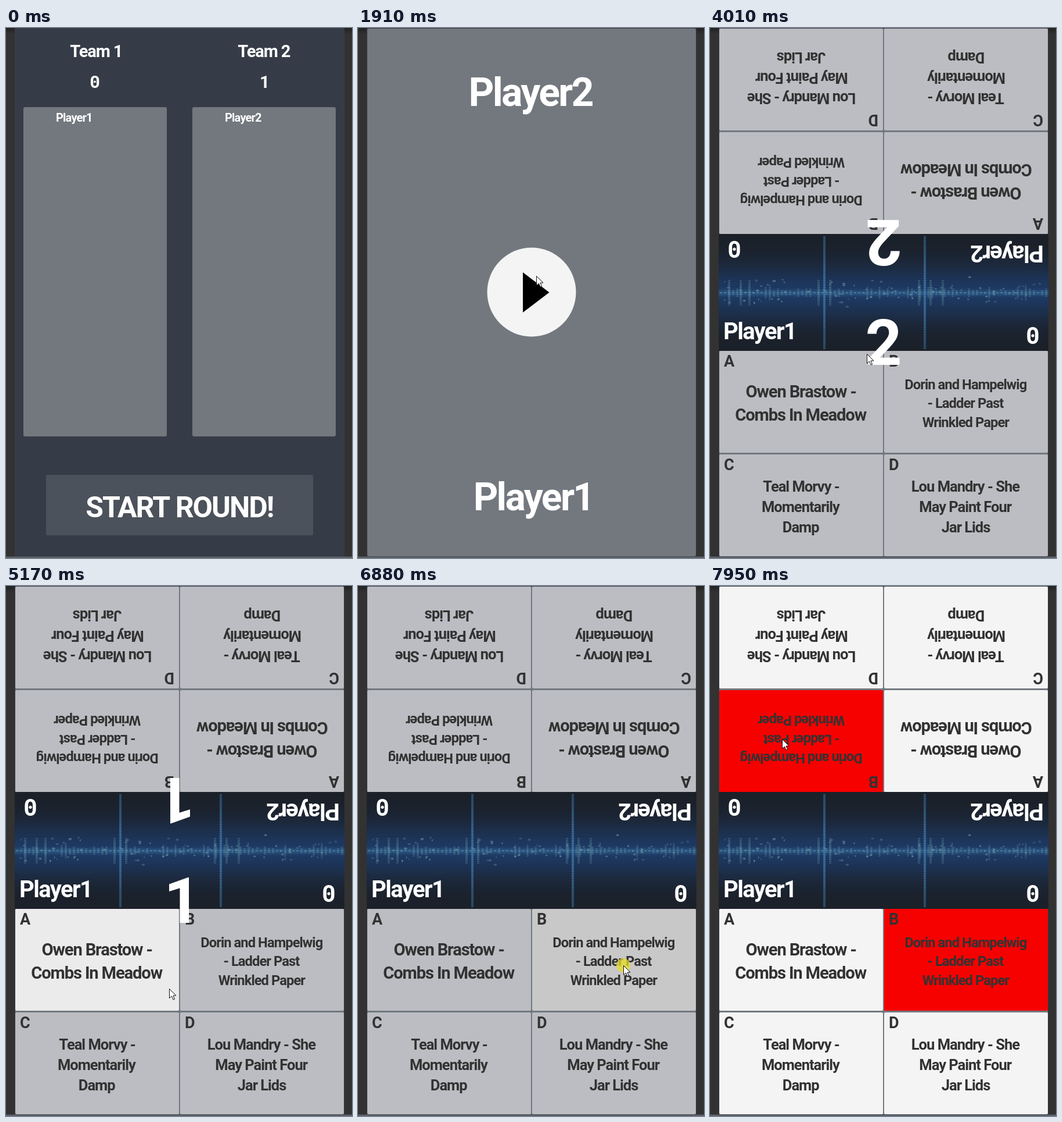
These frames come from a looping animation (596 px wide and 911 px high, 8000 ms). An HTML page with a canvas:

```html
<!DOCTYPE html>
<html lang="en">
<head>
<meta charset="utf-8">
<title>Music quiz</title>
<style>
html, body { margin: 0; width: 100%; height: 100%; overflow: hidden; background: #323232; }
canvas { display: block; width: 596px; height: 911px; }
</style>
</head>
<body>
<canvas id="stage" width="596" height="911"></canvas>
<script>
const ctx = document.getElementById('stage').getContext('2d');
const LOOP = 8000;
const PANEL = '#73787f';

// Moments at which the state changes, in ms
const PLAY = 1140, GAME = 2610, TICK = 3630, BEAT = 1010;
const RESULT1 = 6940, RESULT2 = 7950;
const CLICK_MS = 140;

const BASE = [188, 189, 194], HOVER = [235, 235, 235], PRESS = [200, 200, 200];

// Line spacing sets the text size of each answer
const ANSWERS = [
  { step: 40, lines: ['Owen Brastow -', 'Combs In Meadow'] },
  { step: 32.5, lines: ['Dorin and Hampelwig', '- Ladder Past', 'Wrinkled Paper'] },
  { step: 35, lines: ['Teal Morvy -', 'Momentarily', 'Damp'] },
  { step: 35, lines: ['Lou Mandry - She', 'May Paint Four', 'Jar Lids'] }
];
const TILES = ANSWERS.map((answer, i) => {
  const x = i % 2 ? 300 : 16, y = i < 2 ? 555 : 733;
  return { ...answer, label: 'ABCD'[i], x, y, w: 282, h: 175 };
});
const BUTTON = { x: 69, y: 768, w: 460, h: 104 };

// Pointer moves: from, until, to x, to y
const MOVES = [
  [590, 1000, 418, 795], [1510, 1910, 307, 426], [2060, 2140, 297, 479],
  [2760, 3160, 288, 447], [3930, 4010, 270, 560], [4010, 4330, 219, 690],
  [4640, 5100, 281, 692], [5190, 5650, 502, 648], [5800, 6190, 473, 646],
  [6570, 6720, 457, 652], [7180, 7410, 124, 263]
];

const clamp = v => Math.max(0, Math.min(1, v));
const ease = k => k * k * (3 - 2 * k);
const mix = (a, b, k) => a.map((v, i) => v + (b[i] - v) * k);
const rgb = c => `rgb(${c.map(Math.round)})`;

function seeded(seed) {
  return () => (seed = (seed * 16807) % 2147483647) / 2147483647;
}

function pointer(t) {
  return MOVES.reduce((p, [from, until, x, y]) =>
    mix(p, [x, y], ease(clamp((t - from) / (until - from)))), [600, 640]);
}

const clicking = t => [PLAY, GAME, RESULT1, RESULT2].some(end => t >= end - CLICK_MS && t < end);

function inside(r, [x, y]) {
  return x > r.x && x < r.x + r.w && y > r.y && y < r.y + r.h;
}

// Averages the recent past, so that hover colours fade in and out
function hover(r, t, turned) {
  let sum = 0;
  for (let lag = 20; lag <= 100; lag += 20) {
    const [x, y] = pointer(t - lag);
    sum += inside(r, turned ? [598 - x, 909 - y] : [x, y]);
  }
  return sum / 5;
}

function box({ x, y, w, h }, color, r = 3) {
  ctx.fillStyle = color;
  ctx.beginPath();
  ctx.roundRect(x, y, w, h, r);
  ctx.fill();
}

function disc(x, y, r, color) {
  ctx.fillStyle = color;
  ctx.beginPath();
  ctx.arc(x, y, r, 0, 7);
  ctx.fill();
}

function shape(points, color) {
  ctx.fillStyle = color;
  ctx.beginPath();
  points.forEach(p => ctx.lineTo(...p));
  ctx.closePath();
  ctx.fill();
}

function text(str, x, y, size, { color = '#fff', left = false, weight = 700 } = {}) {
  ctx.font = `${weight} ${size}px Roboto, "Open Sans", sans-serif`;
  ctx.letterSpacing = `${-0.04 * size}px`;
  ctx.fillStyle = color;
  const m = ctx.measureText(str);
  const shift = left ? 0 : (m.actualBoundingBoxRight - m.actualBoundingBoxLeft) / 2;
  ctx.fillText(str, x - shift, y);
}

function zero(x, y, size) {
  text('0', x, y, size);
  disc(x, y - size * 0.355, size * 0.065, '#fff');
}

// Runs a drawing for the lower player, then again turned for the upper one
function bothSides(draw) {
  draw(false);
  ctx.save();
  ctx.translate(598, 909);
  ctx.rotate(Math.PI);
  draw(true);
  ctx.restore();
}

function makeBand() {
  const c = document.createElement('canvas');
  c.width = 568;
  c.height = 201;
  const g = c.getContext('2d');
  const rnd = seeded(71);
  const mid = 101;

  for (let y = 0; y < 201; y++) {
    const glow = s => Math.exp(-(((y - mid) / s) ** 2));
    g.fillStyle = rgb(mix(mix([27, 32, 40], [29, 57, 99], glow(48)), [52, 104, 150], 0.6 * glow(5)));
    g.fillRect(0, y, 568, 1);
  }

  const column = (x, half, w, color, alpha) => {
    g.fillStyle = color;
    for (let d = 0; d <= half; d += 3) {
      g.globalAlpha = alpha * (1 - 0.55 * d / (half + 1));
      g.fillRect(x - w / 2, mid - d - 1, w, 2);
      if (d) g.fillRect(x - w / 2, mid + d - 1, w, 2);
    }
  };
  for (let x = 4; x < 566; x += 7) column(x, 2 + 12 * rnd() ** 3, 3, '#78a9b4', 0.5);
  for (const x of [18, 38, 53, 386]) column(x, 22, 4, '#6a9dac', 0.6);
  for (const x of [182, 355]) {
    for (const side of [-10, 10]) column(x + side, 23, 4, '#6a9dac', 0.6);
    g.globalAlpha = 0.3;
    g.fillStyle = '#1f568f';
    g.fillRect(x - 2, 3, 4, 195);
    column(x, 98, 4, '#4a8ab8', 0.85);
  }

  g.fillStyle = '#7fadb2';
  for (let i = 0; i < 90; i++) {
    const x = rnd() * 568, y = mid + (rnd() + rnd() - 1) * 30;
    g.globalAlpha = 0.2 + rnd() * 0.35;
    g.beginPath();
    g.ellipse(x, y, 1 + rnd() * 2, 1 + rnd(), 0, 0, 7);
    g.fill();
  }
  return c;
}
const band = makeBand();

function drawFrame() {
  ctx.fillStyle = '#323232';
  ctx.fillRect(0, 0, 596, 911);
  const top = ctx.createLinearGradient(0, 0, 0, 11);
  top.addColorStop(0, '#222');
  top.addColorStop(1, '#323232');
  ctx.fillStyle = top;
  ctx.fillRect(0, 0, 596, 11);
  ctx.fillStyle = '#363c47';
  ctx.fillRect(15, 0, 568, 909);
  ctx.fillStyle = '#5d6269';
  ctx.fillRect(0, 908.5, 596, 2.5);
}

function drawLobby(t) {
  for (const n of [1, 2]) {
    const x = n === 1 ? 30 : 321;
    text('Team ' + n, x + 123.5, 50, 29);
    box({ x, y: 136, w: 247, h: 566 }, PANEL);
    text('Player' + n, x + 56, 161, 20, { left: true });
  }
  zero(153, 103, 30);
  text('1', 444, 103, 30);
  box(BUTTON, rgb(mix([76, 82, 91], [94, 99, 107], hover(BUTTON, t))));
  text('START ROUND!', 299, 841, 50);
}

function drawPanel() {
  box({ x: 16, y: 1, w: 566, h: 907 }, PANEL);
}

function drawReady() {
  drawPanel();
  text('Player2', 299.5, 134, 68);
  text('Player1', 299.5, 829, 66);
  disc(299, 454, 76.5, '#f4f4f4');
  shape([[284, 420], [329.5, 454.5], [284, 489]], '#000');
}

function tileColor(t, tile, upper) {
  if (t >= (upper ? RESULT2 : RESULT1)) return tile.label === 'B' ? '#f70000' : '#f4f4f4';
  const over = hover(tile, t, upper);
  return rgb(mix(BASE, over && clicking(t) ? PRESS : HOVER, over));
}

function drawTiles(t, upper) {
  const style = { color: '#323232', weight: 600 };
  for (const tile of TILES) {
    const { x, y, step, lines } = tile;
    box(tile, tileColor(t, tile, upper), 2);
    text(tile.label, x + 8, y + 27, 27, { ...style, left: true });
    const first = y + 89.5 - (lines.length - 1) * step / 2 + step * 0.27;
    lines.forEach((line, n) => text(line, x + 141, first + n * step, step * 0.73, style));
  }
}

function drawGame(t) {
  drawPanel();
  bothSides(upper => drawTiles(t, upper));
  ctx.drawImage(band, 15, 354);
  const count = 3 - Math.max(0, Math.ceil((t - TICK + 1) / BEAT));
  bothSides(upper => {
    text(upper ? 'Player2' : 'Player1', 23, 535, 40, { left: true });
    zero(556, 543, 40);
    if (count > 0) text(count, 298.5, 579, 110);
  });
}

function drawPointer(t) {
  const [x, y] = pointer(t);
  if (clicking(t)) disc(x, y, 12, 'rgba(230,220,40,.75)');
  ctx.save();
  ctx.translate(Math.round(x) + 0.5, Math.round(y) + 0.5);
  shape([[0, 0], [0, 16], [4, 12.5], [6.5, 18.5], [9, 17.5], [6.5, 11.5], [11.5, 11.5]], '#fff');
  ctx.strokeStyle = '#111';
  ctx.stroke();
  ctx.restore();
}

const start = performance.now();
function render() {
  const t = (performance.now() - start) % LOOP;
  drawFrame();
  if (t < PLAY) drawLobby(t);
  else if (t < GAME) drawReady();
  else drawGame(t);
  drawPointer(t);
  requestAnimationFrame(render);
}
render();
</script>
</body>
</html>
```
